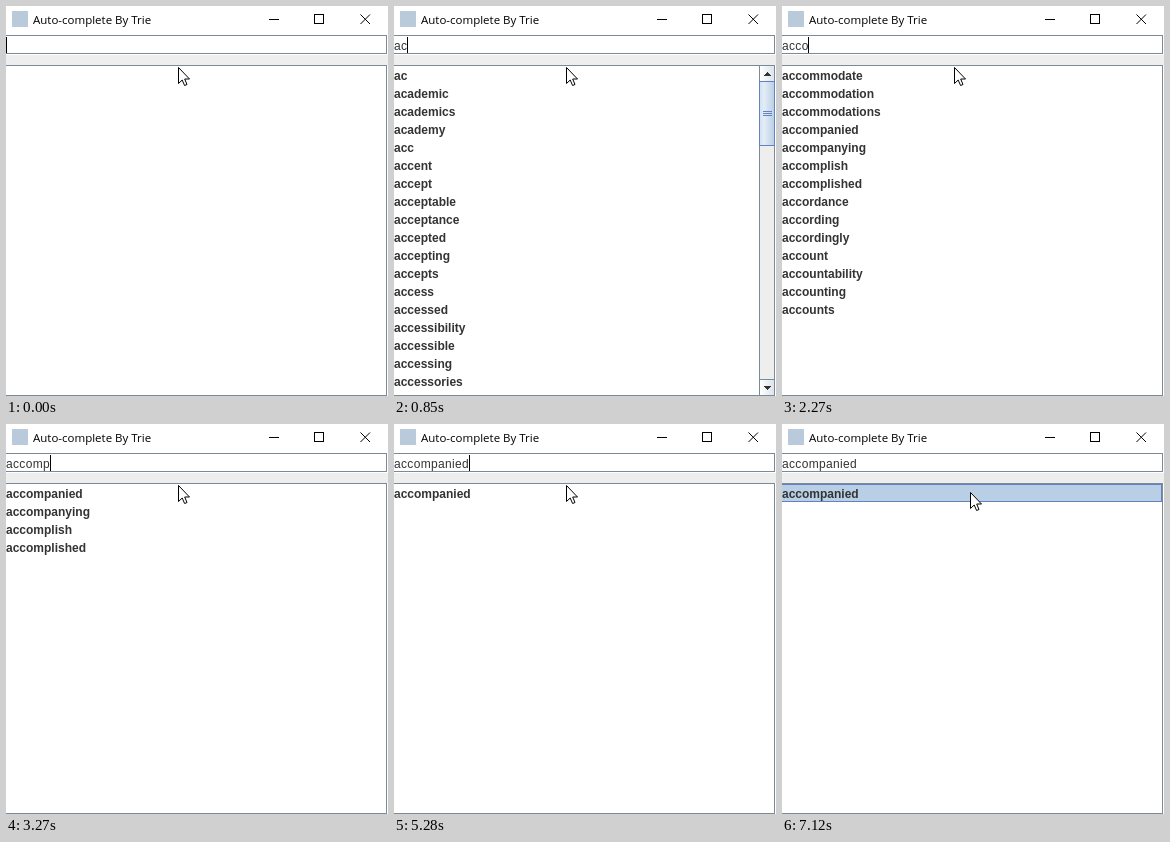
These frames come from a looping animation (382x390 px, 9730 ms). An HTML page:

```html
<!DOCTYPE html>
<html lang="en">
<head>
<meta charset="utf-8">
<title>Auto-complete By Trie</title>
<style>
  html, body { margin: 0; width: 100%; height: 100%; overflow: hidden; background: #fff; }
  svg { display: block; width: 382px; height: 390px; }
  text { white-space: pre; }
  .title { font: 11.5px "Open Sans", "Noto Sans", sans-serif; fill: #000; }
  .field { font: 12px "Liberation Sans", Arial, sans-serif; letter-spacing: .33px; fill: #333; }
  .row { font: bold 12px "Liberation Sans", Arial, sans-serif; fill: #333; }
  .edge { fill: none; stroke: #7a8a99; }
  .crisp { shape-rendering: crispEdges; }
</style>
</head>
<body>
<svg viewBox="0 0 382 390">
  <defs>
    <linearGradient id="thumbFill">
      <stop offset="0" stop-color="#d2e1ef"/>
      <stop offset=".3" stop-color="#e4edf6"/>
      <stop offset="1" stop-color="#b8cfe5"/>
    </linearGradient>
    <linearGradient id="buttonFill">
      <stop offset="0" stop-color="#fff"/>
      <stop offset="1" stop-color="#dde4eb"/>
    </linearGradient>
  </defs>

  <rect width="382" height="390" fill="#fff"/>
  <rect x="6" y="5" width="16" height="16" fill="#b9cadb"/>
  <text class="title" x="27" y="18">Auto-complete By Trie</text>
  <g fill="none" stroke="#000">
    <path class="crisp" d="M263 13.5h10M308.5 8.5h9v9h-9z"/>
    <path d="M354.5 8.5l9.5 9.5M364 8.5l-9.5 9.5"/>
  </g>

  <g class="crisp">
    <rect y="49" width="382" height="10" fill="#eee"/>
    <path class="edge" d="M0 29.5H380.5V47.5H0M0 59.5H380.5V389.5H0"/>
  </g>
  <text class="field" id="field" x="0" y="44"></text>
  <rect class="crisp" id="caret" y="31" width="1" height="16" fill="#000"/>

  <g class="crisp" id="selection">
    <rect x="-.5" y="60.5" width="380" height="17" fill="#b8cfe5" stroke="#6382bf"/>
  </g>
  <g id="rows"></g>

  <g class="crisp" id="scrollbar">
    <rect x="365" y="60" width="15" height="329" fill="#eee"/>
    <rect x="366" y="60" width="14" height="15" fill="url(#buttonFill)"/>
    <rect x="366" y="374" width="14" height="15" fill="url(#buttonFill)"/>
    <path class="edge" d="M365.5 60V389M365 75.5H380M365 373.5H380"/>
    <path d="M369 70h8l-4-4zM369 380h8l-4 4z" fill="#333"/>
    <rect id="thumb" x="365.5" y="75.5" width="15" fill="url(#thumbFill)" stroke="#6382bf"/>
    <path id="grip" d="M369 -2.5h9M369 -.5h9M369 1.5h9" stroke="#6382bf"/>
  </g>

  <path id="cursor" d="M.5 .5V16.5L4.2 13L6.6 18.5L9 17.5L6.7 12H11.5Z" fill="#fff" stroke="#000"/>
</svg>

<script>
const LOOP = 9730;
const TYPED = "accompanied";
const keyTimes = [280, 850, 1720, 2140, 2840, 3270, 3680, 4100, 4810, 4970, 5280];
// The list is laid out late whenever its scroll bar appears or goes.
const listTimes = keyTimes.map((t, i) => i === 0 || i === 3 ? t + 130 : t);
const caretHidden = [[1290, 1720], [2700, 2840], [4530, 4810], [5860, 6290], [6870, LOOP]];
const cursorStops = [[0, 172, 61], [6730, 177, 61], [6870, 183, 64], [7000, 188, 68]];
const SELECT_TIME = 7120;

const ROW = 18, VISIBLE = 18, TRACK = 298, VIEW = 329;
const totals = { a: 650, ac: 85, acc: 37 };
const words = `a aa aaa aaron ab abandoned abc aberdeen abilities ability able
  aboriginal abortion about above abraham abroad abs ac academic academics academy
  acc accent accept acceptable acceptance accepted accepting accepts access accessed
  accessibility accessible accessing accessories accessory accident accidents
  accommodate accommodation accommodations accompanied accompanying accomplish
  accomplished accordance according accordingly account accountability accounting
  accounts`.split(/\s+/);

const $ = id => document.getElementById(id);
const show = (id, on) => $(id).setAttribute("visibility", on ? "visible" : "hidden");
const passed = (times, t) => times.filter(time => time <= t).length;
const charWidth = c => ({ i: 3, c: 6, m: 11 })[c] || 7;
const textWidth = s => [...s].reduce((sum, c) => sum + charWidth(c), 0);

const rows = Array.from({ length: VISIBLE }, (_, i) => {
  const row = document.createElementNS("http://www.w3.org/2000/svg", "text");
  row.setAttribute("class", "row");
  row.setAttribute("x", 0);
  row.setAttribute("y", 74 + i * ROW);
  return $("rows").appendChild(row);
});

function drawList(prefix) {
  const matches = prefix ? words.filter(w => w.startsWith(prefix)) : [];
  rows.forEach((row, i) => { row.textContent = matches[i] || ""; });

  const total = totals[prefix];
  show("scrollbar", total);
  if (total) {
    const height = Math.max(16, Math.round(TRACK * VIEW / (total * ROW)));
    $("thumb").setAttribute("height", height);
    $("grip").setAttribute("transform", `translate(0 ${76 + Math.floor(height / 2)})`);
  }
}

function draw(t) {
  const text = TYPED.slice(0, passed(keyTimes, t));
  $("field").textContent = text;
  $("caret").setAttribute("x", textWidth(text));
  show("caret", !caretHidden.some(([from, to]) => t >= from && t < to));
  drawList(TYPED.slice(0, passed(listTimes, t)));
  show("selection", t >= SELECT_TIME);
  const [, x, y] = cursorStops.filter(([time]) => time <= t).pop();
  $("cursor").setAttribute("transform", `translate(${x} ${y})`);
}

const start = performance.now();
function tick() {
  draw((performance.now() - start) % LOOP);
  requestAnimationFrame(tick);
}
tick();
</script>
</body>
</html>
```
